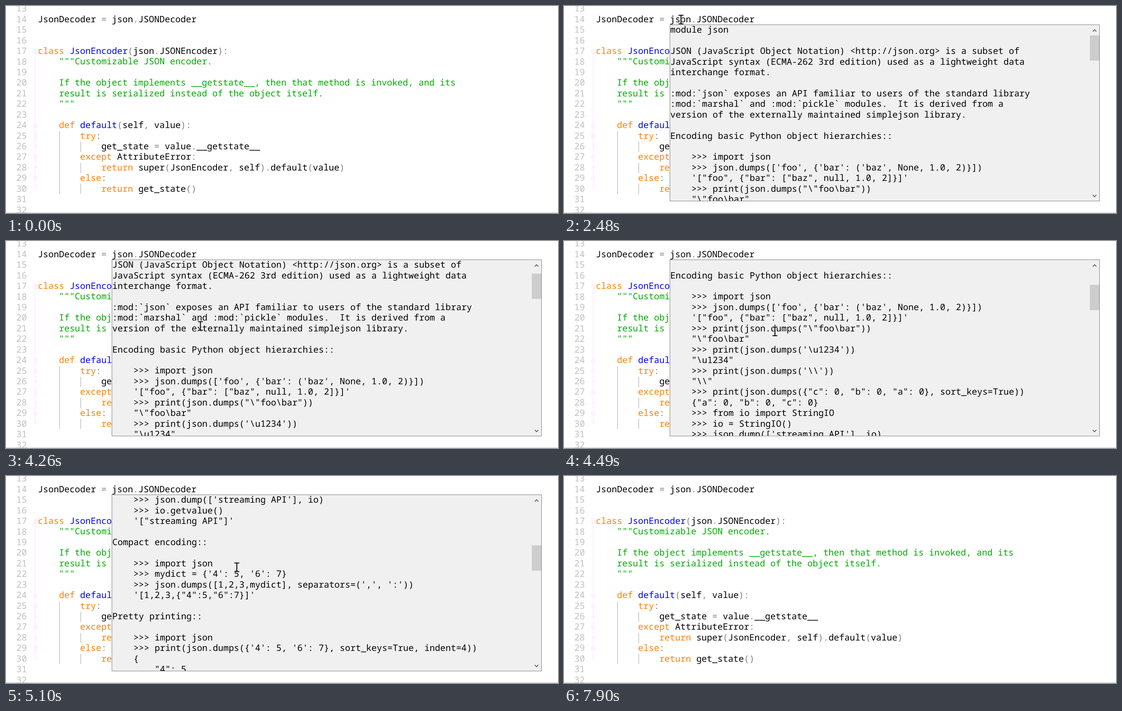
An HTML page for the animation above (8 s loop, 1222 by 458 pixels).

```html
<!DOCTYPE html>
<html lang="en">
<head>
<meta charset="utf-8">
<title>Documentation popup in a code editor</title>
<style>
@property --line { syntax: "<number>"; inherits: true; initial-value: 0; }

html, body { margin: 0; width: 100%; height: 100%; overflow: hidden; background: #fff; }
#stage { position: relative; width: 1222px; height: 458px; overflow: hidden; }
#stage::after {
  content: ""; position: absolute; left: 0; bottom: 0; width: 100%; height: 1px; background: #c6c6c6;
}
pre {
  position: absolute; margin: 0; color: #000;
  font: 19.53px/23.44px "Noto Sans Mono", monospace;
  font-variant-ligatures: none; text-rendering: geometricPrecision;
}
svg { position: absolute; left: 0; top: 0; overflow: visible; fill: none; }

#numbers { left: 22.8px; top: -6.7px; color: #c0c0c0; }
#code { left: 70.4px; top: 16.7px; }
#code b { color: #ff8000; font-weight: 400; }
#code dfn { color: #00f; font-style: normal; }
#code i { color: #808080; font-style: normal; }
#code q { color: #0a0; quotes: none; }

#popup {
  position: absolute; left: 234px; top: 41px; width: 952px; height: 391px;
  box-sizing: border-box; border: 1px solid #808080; background: #f0f0f0;
  overflow: hidden; visibility: hidden;
  animation: show 8s step-end infinite, scroll 8s step-end infinite;
}
#doc { left: .3px; top: -1.8px; transform: translateY(calc(var(--line) * -23.44px)); }
#thumb {
  position: absolute; right: 0; top: 23px; width: 21px; height: 56px; background: #cdcdcd;
  transform: translateY(calc(var(--line) * 3.54px));
}
#mouse { transform: translate(359px, -30px); animation: move 8s step-end infinite; }

@keyframes show {
  0%, 94.5% { visibility: hidden; }
  31% { visibility: visible; }
}
@keyframes scroll {
  0% { --line: 0; }
  53.25% { --line: 2; animation-timing-function: steps(2); }
  55.16% { --line: 6; }
  56.125% { --line: 9; animation-timing-function: steps(8); }
  63.75% { --line: 25; }
  64.75% { --line: 28; }
  65.75%, 100% { --line: 30; }
}
@keyframes move {
  0% { transform: translate(359px, -30px); }
  14.375% { transform: translate(359px, -2px); animation-timing-function: steps(5); }
  19.1875% { transform: translate(300px, 20px); animation-timing-function: steps(5); }
  24% { transform: translate(259px, 30px); }
  35% { transform: translate(254px, 33px); animation-timing-function: steps(4); }
  38.85% { transform: translate(217px, 62px); animation-timing-function: steps(6); }
  44.625% { transform: translate(316px, 146px); }
  45.625% { transform: translate(332px, 153px); animation-timing-function: steps(2); }
  47.375% { transform: translate(357px, 164px); animation-timing-function: steps(9); }
  56.125% { transform: translate(467px, 200px); animation-timing-function: steps(8); }
  63.75% { transform: translate(511px, 202px); animation-timing-function: steps(2); }
  65.75% { transform: translate(522px, 199px); }
  66.625% { transform: translate(523px, 198px); }
  68.75% { transform: translate(521px, 203px); animation-timing-function: steps(4); }
  72.7% { transform: translate(497px, 221px); animation-timing-function: steps(3); }
  75.66% { transform: translate(467px, 205px); animation-timing-function: steps(2); }
  77.625% { transform: translate(481px, 185px); }
  78.625% { transform: translate(490px, 164px); }
  79.5% { transform: translate(494px, 152px); animation-timing-function: steps(5); }
  84.375% { transform: translate(516px, 75px); animation-timing-function: steps(5); }
  89.25% { transform: translate(528px, 23px); }
  90.25% { transform: translate(529px, 17px); animation-timing-function: steps(9); }
  98.75%, 100% { transform: translate(531px, -30px); }
}
</style>
</head>
<body>
<div id="stage">
<pre id="numbers">
13
14
15
16
17
18
19
20
21
22
23
24
25
26
27
28
29
30
31
32</pre>
<pre id="code">
JsonDecoder <i>=</i> json<i>.</i>JSONDecoder


<b>class</b> <dfn>JsonEncoder</dfn><i>(</i>json<i>.</i>JSONEncoder<i>):</i>
<q>    """Customizable JSON encoder.

    If the object implements __getstate__, then that method is invoked, and its
    result is serialized instead of the object itself.
    """</q>

    <b>def</b> <dfn>default</dfn><i>(</i>self<i>,</i> value<i>):</i>
        <b>try</b><i>:</i>
            get_state <i>=</i> value<i>.</i>__getstate__
        <b>except</b> AttributeError<i>:</i>
            <b>return</b> super<i>(</i>JsonEncoder<i>,</i> self<i>).</i>default<i>(</i>value<i>)</i>
        <b>else</b><i>:</i>
            <b>return</b> get_state<i>()</i></pre>
<svg width="1222" height="458">
  <path stroke="#a6a6a6" d="M118.5 277V416M165.5 300V323M165.5 347V370M165.5 393V416"/>
  <g stroke="#ffd8ff">
    <path d="M64.5 100V404.5H69M65 310.5h4M65 357.5h4"/>
    <defs><path id="fold" fill="#fff" d="M61.5-3.5h7v7h-7zM63 0h4"/></defs>
    <use href="#fold" y="100.5"/>
    <use href="#fold" y="264.5"/>
    <use href="#fold" y="287.5"/>
    <use href="#fold" y="334.5"/>
    <use href="#fold" y="381.5"/>
  </g>
</svg>
<div id="popup">
<pre id="doc">
module json

JSON (JavaScript Object Notation) &lt;http://json.org&gt; is a subset of
JavaScript syntax (ECMA-262 3rd edition) used as a lightweight data
interchange format.

:mod:`json` exposes an API familiar to users of the standard library
:mod:`marshal` and :mod:`pickle` modules.  It is derived from a
version of the externally maintained simplejson library.

Encoding basic Python object hierarchies::

    &gt;&gt;&gt; import json
    &gt;&gt;&gt; json.dumps(['foo', {'bar': ('baz', None, 1.0, 2)}])
    '["foo", {"bar": ["baz", null, 1.0, 2]}]'
    &gt;&gt;&gt; print(json.dumps("\"foo\bar"))
    "\"foo\bar"
    &gt;&gt;&gt; print(json.dumps('\u1234'))
    "\u1234"
    &gt;&gt;&gt; print(json.dumps('\\'))
    "\\"
    &gt;&gt;&gt; print(json.dumps({"c": 0, "b": 0, "a": 0}, sort_keys=True))
    {"a": 0, "b": 0, "c": 0}
    &gt;&gt;&gt; from io import StringIO
    &gt;&gt;&gt; io = StringIO()
    &gt;&gt;&gt; json.dump(['streaming API'], io)
    &gt;&gt;&gt; io.getvalue()
    '["streaming API"]'

Compact encoding::

    &gt;&gt;&gt; import json
    &gt;&gt;&gt; mydict = {'4': 5, '6': 7}
    &gt;&gt;&gt; json.dumps([1,2,3,mydict], separators=(',', ':'))
    '[1,2,3,{"4":5,"6":7}]'

Pretty printing::

    &gt;&gt;&gt; import json
    &gt;&gt;&gt; print(json.dumps({'4': 5, '6': 7}, sort_keys=True, indent=4))
    {
        "4": 5,
        "6": 7
    }

Decoding JSON::</pre>
<div id="thumb"></div>
<svg width="950" height="389" stroke="#505050" stroke-width="1.7">
  <path d="M935.5 14.5l4-4 4 4M935.5 376l4 4 4-4"/>
</svg>
</div>
<svg id="mouse" width="1" height="1">
  <g id="beam" stroke-linecap="square">
    <path stroke="#fff" stroke-width="3.5" d="M-4.5-9.5h9M0-9.5v19M-4.5 9.5h9"/>
    <path stroke="#000" stroke-width="2" d="M-4.5-9.5h9M0-9.5v19M-4.5 9.5h9"/>
  </g>
</svg>
</div>
</body>
</html>
```
